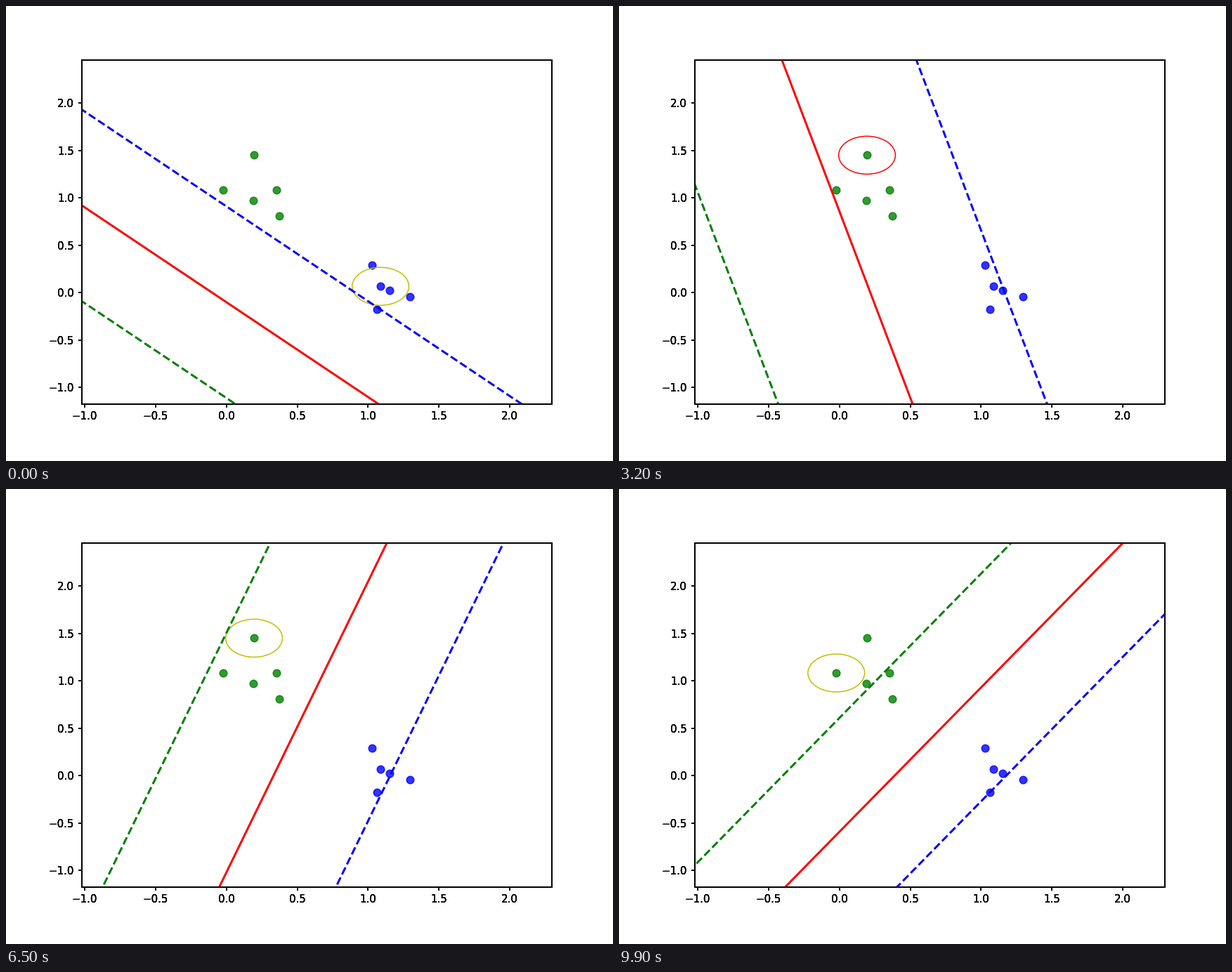
These frames come from a looping animation (864 px wide and 648 px high, 10000 ms). A matplotlib script:

```python
import random

import matplotlib.pyplot as plt
import numpy as np
from matplotlib.animation import FuncAnimation
from matplotlib.patches import Ellipse

STEPS = 100
RATE, DECAY = 0.05, 0.1

GREEN = [(-0.022, 1.083), (0.195, 1.45), (0.188, 0.971), (0.352, 1.081), (0.373, 0.806)]
BLUE = [(1.028, 0.29), (1.088, 0.067), (1.151, 0.024), (1.298, -0.04), (1.062, -0.172)]
points = np.array(GREEN + BLUE)
signs = np.repeat([-1, 1], 5)
inputs = np.column_stack([points, np.ones(10)])

# Key poses: step -> (sample, w1, w2, bias)
KEYS = {
    0: (6, 0.99, 0.99, 0.099),
    21: (5, 1.04, 0.508, -0.123),
    42: (1, 1.079, 0.04, -0.337),
    51: (9, 1.237, -0.029, -0.21),
    65: (1, 1.215, -0.396, -0.404),
    84: (7, 1.338, -0.706, -0.42),
    99: (0, 1.268, -0.833, -0.493),
}


def pick_samples():
    rng = random.Random(4)
    order = [i for _ in range(STEPS // 10) for i in rng.sample(range(10), 10)]
    for step, (sample, *_) in KEYS.items():
        order[step] = sample
    return order


def sgd_step(theta, index):
    """One hinge-loss update with weight decay."""
    new = theta * [1 - RATE * DECAY, 1 - RATE * DECAY, 1]
    if signs[index] * (inputs[index] @ theta) < 1:
        new = new + RATE * signs[index] * inputs[index]
    return new


def train(order):
    """Run SGD between key poses, spreading the remaining drift evenly."""
    states = np.zeros((STEPS, 3))
    steps = list(KEYS)
    for start, stop in zip(steps, steps[1:]):
        run = [np.array(KEYS[start][1:])]
        for index in order[start + 1:stop + 1]:
            run.append(sgd_step(run[-1], index))
        drift = np.array(KEYS[stop][1:]) - run[-1]
        share = np.linspace(0, 1, len(run))[:, None]
        states[start:stop + 1] = np.array(run) + share * drift
    return states


picks = pick_samples()
states = train(picks)

low, high = points.min(axis=0) - 1, points.max(axis=0) + 1
xs = np.array([low[0] - 2, high[0] + 2])  # lines run past the plot area

plt.rcParams.update({"axes.linewidth": 1, "xtick.major.width": 1,
                     "ytick.major.width": 1})
fig = plt.figure(figsize=(8, 6), dpi=108, facecolor="white")


def add_axes():
    axes = fig.add_axes([0.1245, 0.1256, 0.775, 0.755], facecolor="none")
    axes.set(xlim=(low[0], high[0]), ylim=(low[1], high[1]))
    return axes


# Stacked axes give the heavy frame, ticks and labels
ax = [add_axes() for _ in range(4)][-1]

for group, color in ((GREEN, "g"), (BLUE, "b")):
    ax.scatter(*zip(*group), color=color, s=50, alpha=0.8)
ring = ax.add_patch(Ellipse((0, 0), 0.4, 0.4, fill=False, lw=1))
levels = {0: "r-", -1: "g--", 1: "b--"}
lines = {level: ax.plot([], [], style, lw=2, scalex=False, scaley=False)[0]
         for level, style in levels.items()}


def draw(step):
    w1, w2, bias = states[step]
    slope = w2 if abs(w2) > 1e-4 else 1e-4
    for level, line in lines.items():
        line.set_data(xs, (level - bias - w1 * xs) / slope)
    index = picks[step]
    score = signs[index] * (inputs[index] @ states[max(step - 1, 0)])
    ring.set_center(points[index])
    ring.set_edgecolor("y" if score > 0 else "r")
    return [*lines.values(), ring]


anim = FuncAnimation(fig, draw, frames=STEPS, interval=100, repeat=True,
                     repeat_delay=0, blit=False)
plt.show()
```
